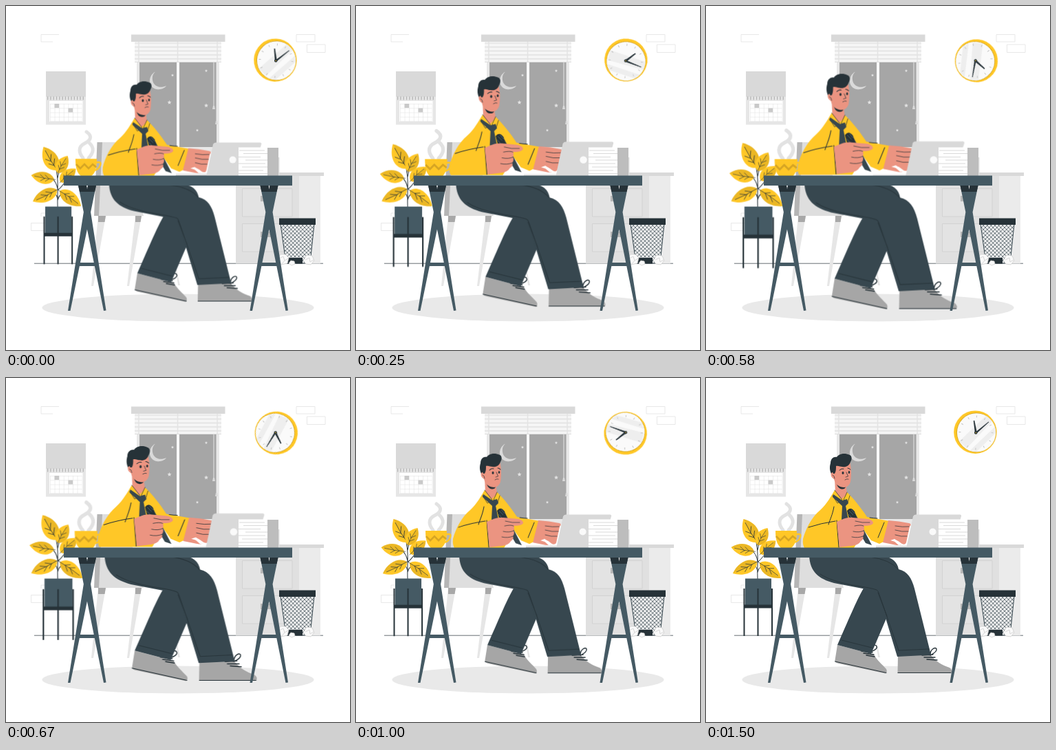
An HTML page for the animation above (1540 ms loop, 500x500 px).

```html
<!DOCTYPE html>
<html lang="en">
<head>
<meta charset="utf-8">
<title>Late night at the desk</title>
<style>
  html, body { margin: 0; width: 100%; height: 100%; overflow: hidden; background: #fff; }
  svg { display: block; width: 100vw; height: 100vh; }
  .line { fill: none; stroke: #263238; stroke-width: 1; stroke-linecap: round; stroke-linejoin: round; }
  .thin { stroke-width: .7; }
  .bold { stroke-width: 1.4; }
  .pale { fill: none; stroke: #e3e3e3; stroke-width: .8; }
  .yellow { fill: #ffc727; }
  .dark { fill: #263238; }
  .slate { fill: #455a64; }
  .cloth { fill: #37474f; }
  .skin { fill: #eb9481; }
  .beat { animation: beat 1540ms ease -12ms infinite; }
  .spin { animation: spin 1540ms linear infinite; transform-origin: 392px 79.4px; }
  #plant { transform-origin: 73px 290px; }
  #cup { transform-origin: 119px 215px; }
  #man { transform-origin: 249px 270px; }
  #laptop { transform-origin: 309.5px 222.5px; }
  @keyframes beat {
    0%, 28%, 70%, 100% { transform: scale(1); }
    14%, 42% { transform: scale(1.074); }
  }
  @keyframes spin {
    from { transform: rotate(2deg); }
    to { transform: rotate(369deg); }
  }
</style>
</head>
<body>
<svg viewBox="0 0 500 500">
  <defs>
    <g id="leaf">
      <path class="yellow" d="M0 0C4-13 23-17 39 0C25 14 7 13 0 0Z"/>
      <path d="M0 0H39C25 14 7 13 0 0Z" fill="#000" opacity=".08"/>
      <path class="line thin" d="M-2 0Q17-2 33-.5M8-.5L14-6M15-1L22-6.500M9-.5L16 5M17-1L24 4"/>
    </g>
    <path id="star" d="M0-3L.9-.9 3-.7 1.400.7 1.900 2.800 0 1.700-1.900 2.800-1.400.7-3-.7-.9-.9Z" fill="#e0e0e0"/>
    <pattern id="mesh" width="5.600" height="5.600" patternUnits="userSpaceOnUse">
      <path d="M0 0L5.600 5.600M5.600 0L0 5.600" stroke="#37474f" stroke-width=".75"/>
    </pattern>
    <pattern id="cells" x="64" y="142" width="6.600" height="6.300" patternUnits="userSpaceOnUse">
      <path d="M0 0H6.600M0 0V6.300" stroke="#dedede" stroke-width="1"/>
    </pattern>
    <g id="trestle">
      <path class="slate" d="M119 261H131L93.500 443H90ZM105 261H117L145.500 442.500 142 443ZM106 373H132V378H105Z"/>
      <path class="dark" d="M105 261H117L118.500 270H107ZM119 261H131L129 270H117.500Z"/>
    </g>
  </defs>

  <!-- Wall -->
  <path class="pale" d="M77 41.500H51V52H68M422 41.500H449V52H422ZM437.500 56H464V67.500H437.500ZM63 315.500H36.500V326.500H55M64 301H51V306"/>
  <ellipse cx="250" cy="438.500" rx="197.500" ry="20" fill="#e9e9e9"/>
  <path d="M41 374.200H461" stroke="#263238" stroke-width=".7"/>

  <!-- Window -->
  <path d="M190 80H310V212H190Z" fill="#e8e8e8"/>
  <path d="M194 80H248V205H194ZM252 80H306V205H252Z" fill="#a6a6a6"/>
  <path d="M248 80H252V206H248Z" fill="#f7f7f7"/>
  <path d="M187 52H313V81.500H187Z" fill="#f5f5f5"/>
  <path d="M187 54H313M187 59.700H313M187 65.400H313M187 71.100H313M187 76.800H313M187 81.500H313" stroke="#dedede" stroke-width="1.200"/>
  <path d="M193 52V81M249.500 52V81M307 52V81" stroke="#e3e3e3" stroke-width="1.500"/>
  <path d="M182 41.500H318.500V52H182Z" fill="#d9d9d9"/>
  <path d="M302 82V146M306 82V168" stroke="#e6e6e6"/>
  <path d="M301 145H303L304 150H300ZM305 167H307L308 172H304Z" fill="#dadada"/>
  <path d="M217 95.500C205 102 207 119 219 121C226 122 231 119 233 116C224 120 216 117 213.500 110C212 104 213 99 217 95.500Z" fill="#dadada"/>
  <use href="#star" transform="translate(242 100.500) scale(.7)"/>
  <use href="#star" transform="translate(291 94) scale(.7)"/>
  <use href="#star" x="237.500" y="140"/>
  <use href="#star" x="291" y="144.500"/>
  <use href="#star" transform="translate(278 180.500) scale(.7)"/>

  <!-- Calendar -->
  <path d="M58 95H116V132H58Z" fill="#d9d9d9"/>
  <path d="M58 132H116V172.500H58Z" fill="#e6e6e6"/>
  <path d="M63 138H111.500V168H63Z" fill="#fff"/>
  <path d="M64 142H110.500V168H64Z" fill="url(#cells)"/>
  <path d="M70.500 142H77V148H70.500ZM90.500 148.500H97V154.500H90.500Z" fill="#c9c9c9"/>
  <path d="M60 134H115" stroke="#b5b5b5" stroke-width="5" stroke-dasharray="1.300 3"/>

  <!-- Clock -->
  <g class="spin">
    <circle class="yellow" cx="391.400" cy="78.700" r="31.200"/>
    <circle cx="392.900" cy="79.300" r="28.700" fill="#c99813"/>
    <circle cx="393.100" cy="79.400" r="28.200" fill="#fafafa"/>
    <path d="M368 92L407 55L416 63L379 102ZM384 105L420 71L421 80L393 107Z" fill="#eee"/>
    <circle cx="392.500" cy="79.400" r="23.500" fill="none" stroke="#b5b5b5" stroke-width="3" stroke-dasharray=".8 11.505"/>
    <path class="dark" d="M391.300 78.900L410.800 63.600 411.300 64.300 392.900 81Z"/>
    <path class="dark" d="M391 80.500L388.800 62 390.300 61.800 393.900 79.500Z"/>
    <circle class="dark" cx="392.200" cy="79.500" r="2.200"/>
    <circle class="yellow" cx="392.200" cy="79.500" r=".7"/>
  </g>

  <!-- Cabinet -->
  <path d="M425 247H457V374.500H425Z" fill="#ebebeb"/>
  <path d="M334 247H426V374.500H334Z" fill="#e0e0e0"/>
  <path d="M330 242H462V247H330Z" fill="#d9d9d9"/>
  <path d="M343.500 265.500H416V306H343.500ZM343.500 316.500H416V357H343.500Z" fill="#e3e3e3" stroke="#cfcfcf" stroke-width=".8"/>
  <path d="M370 276H389V284H370ZM370 328H389V336H370Z" fill="#b8b8b8"/>

  <!-- Chair -->
  <path d="M134 305H145L127 407H124ZM188 305H197L179 407H176ZM246 375L253 406 250 406Z" fill="#e6e6e6"/>
  <path d="M134 305H145L143.500 314H134ZM188 305H197L195.500 314H188Z" fill="#a8a8a8"/>
  <path d="M138 198H171L200 305H134Z" fill="#dedede"/>
  <path d="M132.500 198H140L135 305H128Z" fill="#b5b5b5"/>

  <!-- Bin -->
  <path d="M399 317H448L442 374H407Z" fill="#f2f2f2"/>
  <path d="M399 317H448L442 374H407Z" fill="url(#mesh)" stroke="#37474f"/>
  <path class="dark" d="M397 308.500H450V318H397ZM409 366H431V374.500H409Z"/>
  <g fill="#fafafa" stroke="#cfcfcf" stroke-width=".8" stroke-linejoin="round">
    <path d="M395 367L399 361 406 361 411 366 409 374 400 376Z"/>
    <path d="M397 367L403 364 405 370 410 367M405 370L401 375"/>
    <path d="M432 370L437 362 445 363 448 370 443 376 436 375Z"/>
    <path d="M435 369L441 366 442 372 447 369"/>
    <path d="M411 374L414 370 419 371 420 375 415 377Z"/>
  </g>

  <!-- Plant -->
  <g id="plant" class="beat">
    <path class="line" d="M75 292C74 270 78 250 70 228M75 250Q77 238 83 230M75 266Q73 255 66 250M75 268Q84 260 92 246M75 280Q72 268 62 270M75 282Q78 270 90 273"/>
    <use href="#leaf" transform="translate(74.500 238.500) rotate(-121)"/>
    <use href="#leaf" transform="translate(75 243) rotate(-60) scale(.74 .8)"/>
    <use href="#leaf" transform="translate(70 252) rotate(190) scale(.87 .8)"/>
    <use href="#leaf" transform="translate(79 256) rotate(-41) scale(.76 .8)"/>
    <use href="#leaf" transform="translate(74 267) rotate(154) scale(1 .85)"/>
    <use href="#leaf" transform="translate(78 269) rotate(35) scale(.97 .85)"/>
    <path class="slate" d="M57 291.500H95V330H57Z"/>
    <path class="dark" d="M54.500 329.500H97V334.500H54.500ZM54.500 306H56.500V375H54.500ZM74.500 306H76.500V375H74.500ZM95 306H97V375H95Z"/>
  </g>

  <!-- Cup -->
  <g id="cup" class="beat">
    <path d="M117 183C127 190 122 196 114 200C104 205 106 214 112 221M121 199C129 206 127 214 120 221" fill="none" stroke="#e2e2e2" stroke-width="5" stroke-linecap="round"/>
    <path d="M130 227H136Q138 227 137 231Q135 238 127 239" fill="none" stroke="#ffc727" stroke-width="2.400"/>
    <path class="yellow" d="M101 222H132C132 235 130 242 124 247H109C103 242 101 235 101 222Z"/>
    <path d="M102 230L108 236 114 230 120 236 126 230 131 234" fill="none" stroke="#d6a524" stroke-width="2.600"/>
  </g>

  <!-- Man -->
  <g id="man" class="beat">
    <path d="M191 388L187.500 410C187 413 189 414 193 415L261 429.500Q264 427 262 423C256 416 249 411 244 402Z" fill="#a6a6a6"/>
    <path class="line" d="M187.500 412L262 428.500"/>
    <path d="M279 403L278.500 429H356Q359 425 354 421C343 417 335 413 327 403Z" fill="#a6a6a6"/>
    <path class="line" d="M279 428.500H356"/>
    <path class="line bold" d="M226 397L242 399M229 400L244 402M233 403L245 405M239 397C238 390 246 386 248 390S242 397 239 398M314 403L330 402M317 406L333 406M321 409L336 410M326 402C326 394 334 390 335 394S330 401 326 403"/>
    <path class="cloth" d="M230 304C219 322 205 357 191 388L240 401L264 345L255 300Z"/>
    <path class="cloth" d="M150 258C151 282 164 292 186 298L230 306.500L249 309L278 405L327 402.500L303 306C299 291 293 281 280 278C278 267 271 261 256 258Z"/>
    <path class="line" d="M166 285C190 301 232 302 248 308Q250 309 251 312L280 396M238 260Q268 264 279 278M250 312L263 346M197 381L241 392M280 396L324 394" stroke-opacity=".8"/>

    <path class="yellow" d="M187 164C181 172 176 183 166 192C153 203 145 219 141 234Q140 242 143 247H215L230 222 240 236 252 241 258 238L267 208L234 202C225 188 215 176 206 167Z"/>
    <path class="line" d="M186 187C184 199 180 206 178 213M149 217Q167 211 188 208M238 203Q244 204 249 204M259 210L250 232M190 207L193 246"/>
    <path class="skin" d="M187 146L188 167L196 177L205 169L203 153Z"/>
    <path class="dark" d="M190 154L203 158Q202 162 197 161.500Q192 161 190 154Z"/>
    <path class="yellow" d="M187 163L197 177 190 183 183 170ZM205 166L199 177 206 182 209 172Z"/>
    <path class="line thin" d="M187 163L198 177 191 182 184 171M205 166L200 177 206 181 209 171"/>
    <path class="cloth" d="M185 169L198 178 205 176 207 182 203 186 207 206 197 206 198 186 184 173Z"/>
    <path class="cloth" d="M208 200L217 197 241 243 232 240Z"/>
    <path class="dark" d="M205 193Q210 186 216 194L219 204H208Z"/>
    <path d="M208 193L214 199M211 191L216 197M207 198L213 204" stroke="#607d8b" stroke-width=".6"/>

    <path class="skin" d="M265 207Q281 208 295 211Q300 212 296 216L291 239Q290 243 285 241L274 234L268 236Q276 238 283 241Q284 244 277 243L257 239Z"/>
    <path class="line thin" d="M275 215Q286 217 295 216M275 221Q285 224 294 223M275 228Q284 231 292 230"/>
    <path d="M271 235Q278 235 283 240Q285 243 280 243Z" fill="#fff"/>
    <path class="skin" d="M190 209C199 205 205 202 214 203L236 205Q243 207 243 211Q241 215 229 215Q231 218 229 222Q231 226 228 230Q230 234 225 237Q222 243 211 244L194 246Z"/>
    <path class="line thin" d="M216 215Q225 213 229 215M214 223Q223 225 229 222M212 231Q221 233 228 230M217 208Q227 211 238 210"/>

    <path class="skin" d="M185 126L209 122C212 133 211 145 210 151Q208 158 201 159C194 159 188 155 186 147Q180 143 182 137Z"/>
    <path class="dark" d="M187 139L185 139Q184 135 182 139C179 133 180 127 181 124C181 117 186 114 190 115C194 109 203 109 208 111.500C213 113 212 119 210 122C208 128 203 130 198 129C195 129 192 127 189 128C189 132 189 136 187 139Z"/>
    <path class="line thin" d="M184 141Q187 142 187 146"/>
    <ellipse class="dark" cx="199" cy="138" rx="1.500" ry="2"/>
    <ellipse class="dark" cx="208" cy="137" rx="1.300" ry="1.900"/>
    <path class="line" d="M194 134Q197 131 200 132M206 131Q208 131 210 133"/>
    <path class="line thin" d="M204 137L206.500 143 203 144M202 148Q205 146 207 147"/>
  </g>

  <!-- Laptop -->
  <g id="laptop" class="beat">
    <path d="M247 243H294V247H247Z" fill="#ededed"/>
    <path d="M247 245.500H292V247.500H247Z" fill="#c7c7c7"/>
    <path d="M305 198.500H369Q371.500 198.500 371 201L357 247.500H291L301 201Q302 198.500 305 198.500Z" fill="#d9d9d9"/>
    <circle cx="329.500" cy="223.500" r="5" fill="#fafafa"/>
  </g>

  <!-- Papers -->
  <path d="M338 205.500H381V247H338Z" fill="#fff"/>
  <path d="M339 210H376M345 214.500H380M338 219.500H370M348 224H380M338 229H377M343 234H380M338 239H374M338 243.500H380" stroke="#d9d9d9"/>
  <path d="M380 206H396V247H380Z" fill="#bdbdbd"/>
  <path d="M396 220H397.500V247H396Z" fill="#dedede"/>

  <!-- Desk -->
  <use href="#trestle"/>
  <use href="#trestle" x="264.500"/>
  <path class="slate" d="M84 246.500H416V261H84Z"/>
</svg>
</body>
</html>
```
